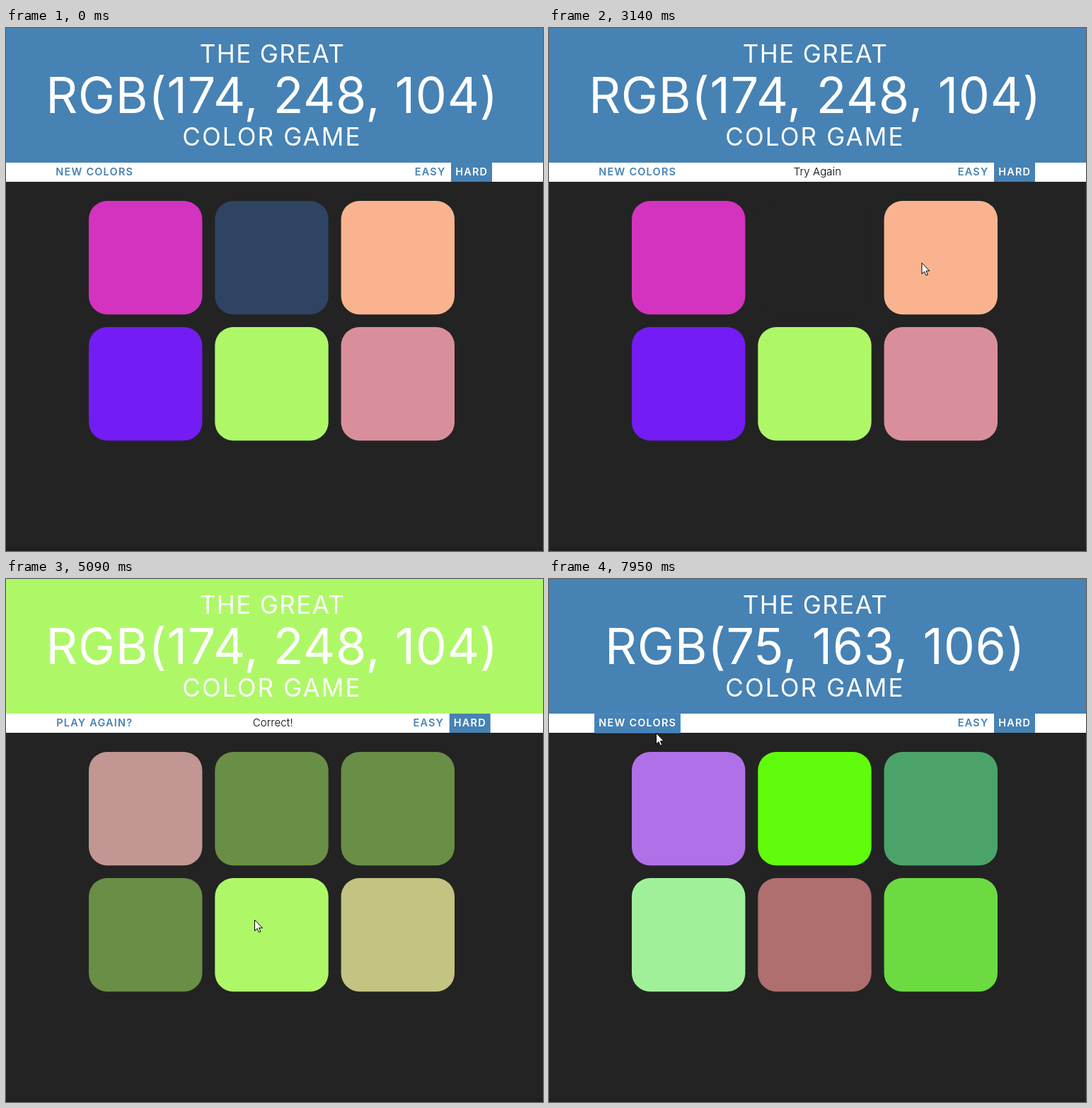
Animation, 759 px wide and 738 px high, one loop 8 s. Source, as an HTML page:

```html
<!DOCTYPE html>
<html lang="en">
<head>
<meta charset="utf-8">
<title>Color game</title>
<style>
html, body { margin: 0; width: 100%; height: 100%; overflow: hidden; background: #232323; }
svg { display: block; width: 100%; height: 100%; }
text { font-family: Inter, "Open Sans", sans-serif; font-optical-sizing: none; text-anchor: middle; }
.title { fill: #fff; font-size: 35px; font-weight: 380; }
#goal { font-size: 70px; letter-spacing: .7px; }
.nav { font-size: 14.5px; font-weight: 600; letter-spacing: 1.2px; fill: steelblue; }
#message { font-size: 15px; font-weight: 300; letter-spacing: .1px; }
</style>
</head>
<body>
<svg viewBox="0 0 759 738">
  <rect width="759" height="738" fill="#232323"/>
  <rect y="733" width="759" height="5" fill="#202020"/>
  <rect id="header" width="759" height="190"/>
  <text class="title" x="376.5" y="49" letter-spacing="1.4">THE GREAT</text>
  <text class="title" id="goal" x="376" y="120"></text>
  <text class="title" x="376" y="166" letter-spacing="2.1">COLOR GAME</text>
  <rect y="190" width="759" height="27" fill="#fff"/>
  <rect id="button" x="64.5" y="190" width="121" height="27" fill="steelblue"/>
  <text class="nav" id="label" x="125.3" y="208"></text>
  <text id="message" x="379.5" y="208"></text>
  <g id="modes">
    <text class="nav" x="599.6" y="208">EASY</text>
    <rect x="629" y="190" width="58" height="27" fill="steelblue"/>
    <text class="nav" x="658.2" y="208" style="fill:#fff">HARD</text>
  </g>
  <g id="squares"></g>
  <path id="pointer" d="M.5.5V16L4 12.7 6.4 18 8.9 17 6.5 11.8H11.4Z" fill="#fff" stroke="#000"/>
</svg>
<script>
const LOOP = 8000, FADE = 300, ENTER = 830, CORRECT = 5003, RESET = 7530, HOVER = 7390;
const $ = id => document.getElementById(id);
const DARK = "#232323", GREEN = "#aef868", BLUE = "steelblue";
const before = ["#d433bf", "#2e4462", "#f9b48f", "#741cf4", GREEN, "#d98f9b"];
const after = ["#b070e8", "#60fc0c", "#4ba36a", "#a0f09a", "#af6f6f", "#6cdb42"];

// Wrong guesses: squares 1, 2 and 3 are clicked in turn.
const misses = [Infinity, 1960, 3290, 4115, Infinity, Infinity];

// Pointer strokes: start time, end time, x, y
const moves = [
  [ENTER, 1250, 382, 410], [1250, 1530, 407, 342], [1600, 1850, 389, 320],
  [2200, 2600, 425, 441], [2600, 3140, 526.5, 331], [3290, 3910, 230, 470],
  [4650, 4840, 351, 480.5], [6280, 6480, 353, 490], [6670, 7480, 154, 208],
  [7900, 7950, 151, 217]
];

const squares = before.map((_, i) => {
  const r = document.createElementNS("http://www.w3.org/2000/svg", "rect");
  const place = { x: 117 + i % 3 * 178.3, y: 244 + (i > 2) * 178, width: 160.4, height: 160.2, rx: 26 };
  for (const k in place) r.setAttribute(k, place[k]);
  return $("squares").appendChild(r);
});

const progress = (t, from, to) => Math.min(1, Math.max(0, (t - from) / (to - from)));
const smooth = p => p * p * (3 - 2 * p);
const blend = (a, b, p) => `color-mix(in srgb, ${a}, ${b} ${(p * 100).toFixed(2)}%)`;

// The CSS "ease" curve, solved by bisection
function ease(x) {
  if (x <= 0 || x >= 1) return x;
  let lo = 0, hi = 1, u;
  for (let i = 0; i < 20; i++) {
    u = (lo + hi) / 2;
    if (.75 * u * (1 - u) + u ** 3 < x) lo = u; else hi = u;
  }
  return .3 * u * (1 - u) ** 2 + 3 * u * u * (1 - u) + u ** 3;
}
const fade = (t, at) => t < at ? 0 : ease(progress(t, at, at + FADE));

function squareColor(i, t) {
  const guess = blend(before[i], DARK, fade(t, misses[i]));
  const win = blend(guess, GREEN, fade(t, CORRECT));
  return blend(win, after[i], fade(t, RESET));
}

function pointerAt(t) {
  let x = 502, y = 706;
  for (const [from, to, endX, endY] of moves) {
    const p = smooth(progress(t, from, to));
    x += (endX - x) * p;
    y += (endY - y) * p;
  }
  return `translate(${x} ${y})`;
}

function setText(id, value) {
  if ($(id).textContent !== value) $(id).textContent = value;
}

function draw(t) {
  const won = t >= CORRECT && t < RESET, fresh = t >= RESET;
  const missed = t >= misses[1] && t < CORRECT;
  squares.forEach((s, i) => s.style.fill = squareColor(i, t));

  $("header").style.fill = won ? GREEN : BLUE;
  setText("goal", fresh ? "RGB(75, 163, 106)" : "RGB(174, 248, 104)");
  setText("label", won ? "PLAY AGAIN?" : "NEW COLORS");
  setText("message", won ? "Correct!" : missed ? "Try Again" : "");
  const shift = `translate(${won ? -2.3 : 0})`;
  $("message").setAttribute("transform", shift);
  $("modes").setAttribute("transform", shift);

  const hover = fade(t, HOVER);
  $("button").style.opacity = hover;
  $("button").style.stroke = fresh ? "#4b8ee0" : "none";
  $("label").style.fill = blend(BLUE, "white", hover);

  $("pointer").setAttribute("transform", pointerAt(t));
  $("pointer").style.visibility = t < ENTER ? "hidden" : "visible";
}

const start = performance.now();
function frame() {
  draw((performance.now() - start) % LOOP);
  requestAnimationFrame(frame);
}
frame();
</script>
</body>
</html>
```
